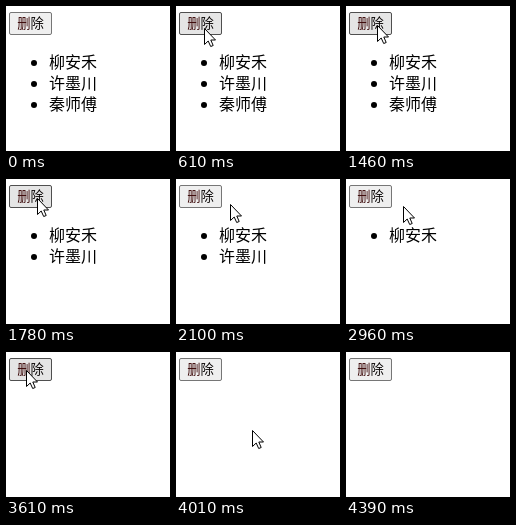
Animation, 164 px wide and 145 px high, one loop 4.79 s. Source, as an HTML page:

```html
<!DOCTYPE html>
<html lang="zh-CN">
<head>
<meta charset="utf-8">
<title>删除列表项</title>
<style>
  html, body { margin: 0; width: 100%; height: 100%; overflow: hidden; background: #fff; }
  body { position: relative; font-family: "Noto Sans CJK SC", "Noto Sans CJK", sans-serif; }
  button {
    position: absolute; left: 3px; top: 6px; width: 43px; height: 23px;
    box-sizing: border-box; padding: 0; border: 1px solid #767676; border-radius: 2px;
    background: #efefef; color: #0c0808; font: 13.333px/19px "Noto Sans CJK SC", "Noto Sans CJK", sans-serif;
    white-space: nowrap; pointer-events: none;
  }
  button span { position: relative; top: -1px; }
  button span:first-child { color: #380404; }
  button.hover { background: #e5e5e5; border-color: #4f4f4f; }
  button.pressed { background: #f5f5f5; border-color: #8d8d8d; }
  ul { position: absolute; left: 43px; top: 45px; margin: 0; padding: 0; list-style: none; font-size: 16px; line-height: 21px; color: #000; }
  li { position: relative; height: 21px; white-space: nowrap; }
  li::before { content: ""; position: absolute; left: -18px; top: 9px; width: 6px; height: 6px; border-radius: 50%; background: #000; }
  #cursor { position: absolute; left: 0; top: 0; width: 13px; height: 20px; }
</style>
</head>
<body>
<button type="button"><span>删</span><span>除</span></button>
<ul><li>柳安禾</li><li>许墨川</li><li>秦师傅</li></ul>
<svg id="cursor" viewBox="0 0 13 20">
  <path d="M.5 .5V16.5L4.2 13 6.7 18.5 9.2 17.5 6.8 12H11.5Z" fill="#fff" stroke="#000"/>
</svg>
<script>
const LOOP = 4790, TICK = 78;
const PRESS_DELAY = TICK, RELEASE_DELAY = 2 * TICK;

// Each move ends at `arrive` after a number of ticks, then rests until the next one.
const entry = { x: 118, y: 117 };
const moves = [
  { arrive: 610, ticks: 7, x: 28, y: 22 },
  { arrive: 1160, ticks: 3, x: 73, y: 29 },
  { arrive: 1460, ticks: 3, x: 31, y: 19, click: true },
  { arrive: 2100, ticks: 5, x: 54, y: 25 },
  { arrive: 2570, ticks: 5, x: 30, y: 19, click: true },
  { arrive: 2960, ticks: 3, x: 57, y: 27 },
  { arrive: 3350, ticks: 4, x: 20, y: 18, click: true },
  { arrive: 4320, ticks: 9, x: 121, y: 126 }
];
const clicks = moves.filter(move => move.click).map(move => move.arrive);
const startOf = move => move.arrive - move.ticks * TICK;
const appear = startOf(moves[0]);
const vanish = moves[moves.length - 1].arrive + 70;

const button = document.querySelector('button');
const items = document.querySelectorAll('li');
const cursor = document.getElementById('cursor');

const overButton = ({ x, y }) => x >= 3 && x < 46 && y >= 6 && y < 29;
const easeOut = k => 1 - (1 - k) ** 2;

// The pointer slows down when it approaches the button and leaves at a steady speed.
function pointerAt(t) {
  let from = entry;
  for (const move of moves) {
    if (t < move.arrive) {
      const tick = Math.max(0, Math.floor((t - startOf(move)) / TICK));
      const linear = tick / move.ticks;
      const k = overButton(move) ? easeOut(linear) : linear;
      return {
        x: Math.round(from.x + (move.x - from.x) * k),
        y: Math.round(from.y + (move.y - from.y) * k)
      };
    }
    from = move;
  }
  return from;
}

function draw(t) {
  const pointer = pointerAt(t);
  const visible = t >= appear && t < vanish;
  cursor.style.visibility = visible ? 'visible' : 'hidden';
  cursor.style.transform = `translate(${pointer.x}px, ${pointer.y}px)`;

  const pressed = clicks.some(at => t >= at + PRESS_DELAY && t < at + RELEASE_DELAY);
  button.classList.toggle('hover', visible && overButton(pointer));
  button.classList.toggle('pressed', pressed);

  const removed = clicks.filter(at => t >= at + RELEASE_DELAY).length;
  items.forEach((item, i) => {
    item.style.visibility = i < items.length - removed ? 'visible' : 'hidden';
  });
}

const start = performance.now();
function frame() {
  draw((performance.now() - start) % LOOP);
  requestAnimationFrame(frame);
}
frame();
</script>
</body>
</html>
```
